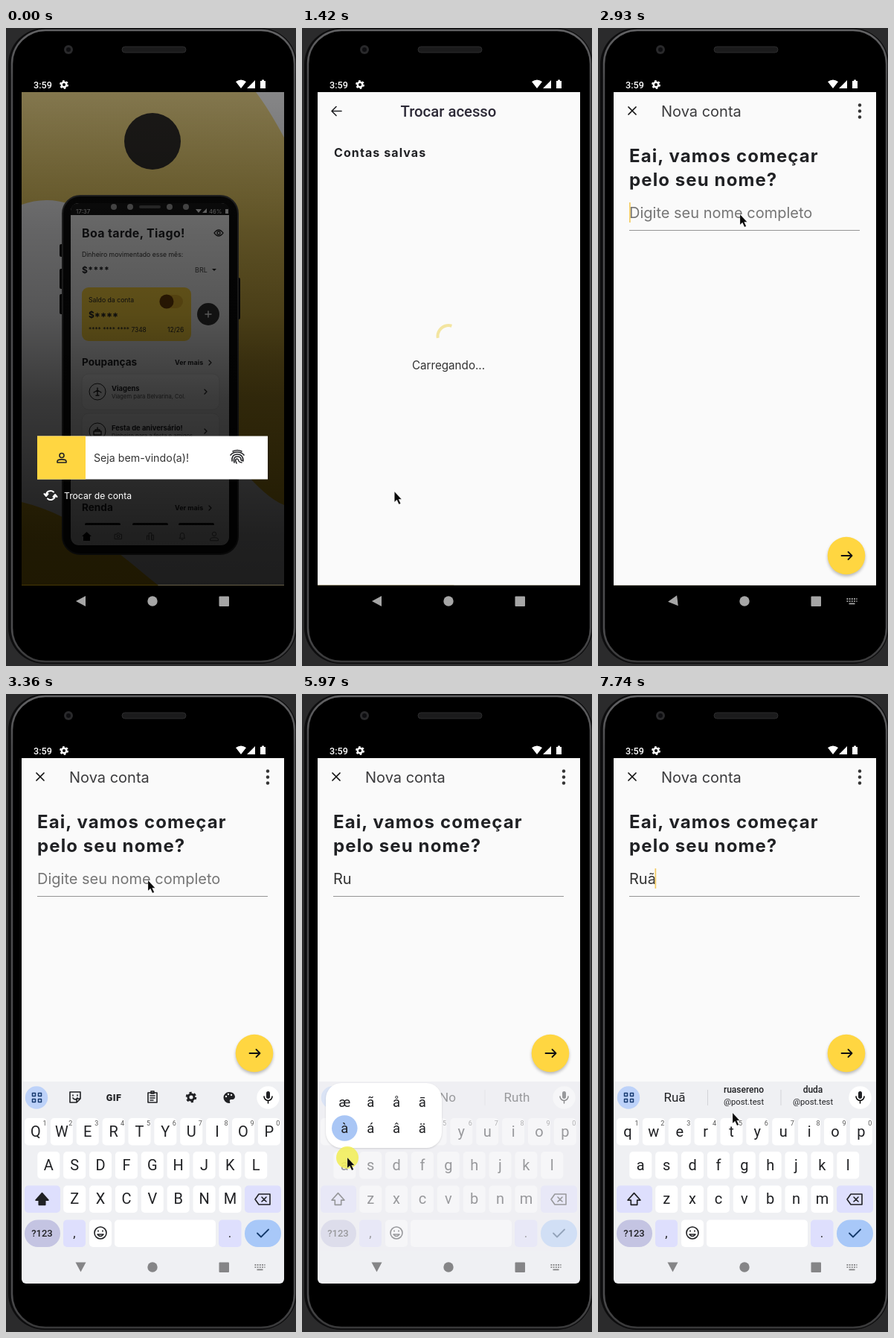
An HTML page for the animation above (8000 ms loop, 390x856 px).

```html
<!DOCTYPE html>
<html lang="pt-BR">
<head>
<meta charset="utf-8">
<title>Trocar acesso</title>
<style>
html, body { margin: 0; width: 100%; height: 100%; overflow: hidden; background: #2b2b2c; }
svg { display: block; width: 100vw; height: 100vh; font-family: Inter, "Open Sans", sans-serif; }
.rb { font-family: Roboto, Arial, sans-serif; }
.b { font-weight: 700; }
.m { text-anchor: middle; }
.line { fill: none; stroke: currentColor; stroke-linecap: round; stroke-linejoin: round; }
</style>
</head>
<body>
<svg id="stage" viewBox="0 0 390 856" preserveAspectRatio="none"></svg>
<script>
const LOOP = 8000, INK = '#202124', GOLD = '#ffd641', PAPER = '#fafafa';
const KEY_STEP = 34.87;

const text = (x, y, size, str, cls = '', fill = INK, extra = '') =>
  `<text x="${x}" y="${y}" font-size="${size}" class="${cls}" fill="${fill}" ${extra}>${str}</text>`;
const rect = (x, y, w, h, fill, r = 0, extra = '') =>
  `<rect x="${x}" y="${y}" width="${w}" height="${h}" rx="${r}" fill="${fill}" ${extra}/>`;
const disc = (x, y, r, fill, extra = '') => `<circle cx="${x}" cy="${y}" r="${r}" fill="${fill}" ${extra}/>`;
const spacing = n => `letter-spacing="${n}"`;

// Stroked icons, each drawn around its own centre.
const ICONS = {
  back: 'M7 0H-6M0-6L-6 0L0 6',
  next: 'M-7 0H7M2-5L7 0L2 5',
  close: 'M-5-5L5 5M5-5L-5 5',
  person: 'M-3-3.5a3 3 0 1 0 6 0a3 3 0 1 0-6 0M-6 6V4.5C-6 1 6 1 6 4.5V6Z',
  swap: 'M-6 0A6 6 0 0 1 4-4.5M6 0A6 6 0 0 1-4 4.5M-8.5-2L-6 1L-3.5-2M8.5 2L6-1L3.5 2',
  finger: 'M-6-8Q0-11 6-8M-9-3Q-6-7 0-7Q6-7 9-3M-7 5Q-8-4 0-4Q8-4 8 5M-4 7Q-6-1 0-1Q5-1 5 3Q5 5 8 4M-1 8Q-4 2 0 2Q1 2 2 5Q3 7 6 7',
  eye: 'M-6 0Q0-8 6 0Q0 8-6 0M-2 0a2 2 0 1 0 4 0a2 2 0 1 0-4 0',
  more: 'M-2-3L1 0L-2 3',
  plus: 'M-4 0H4M0-4V4',
  plane: 'M0-5V5M-5 1L0-2L5 1M-2 5H2',
  cake: 'M-5 5H5V0H-5ZM-3 0V-2H3V0M0-2V-5',
  camera: 'M-5-3H-2L-1-5H1L2-3H5V4H-5ZM-2 0a2 2 0 1 0 4 0a2 2 0 1 0-4 0',
  bars: 'M-5 5V-1H-2V5M-2 5V-5H2V5M2 5V-2H5V5Z',
  bell: 'M-4 3H4L3 1V-2A3 3 0 0 0-3-2V1ZM-1 5H1',
  grid: 'M-6-6h4v4h-4zM2-6h4v4h-4zM-6 2h4v4h-4zM2 2h4v4h-4z',
  sticker: 'M-7-7H7V2L2 7H-7ZM7 2H2V7M-3-2V-3M3-2V-3M-3 1Q0 5 3 1',
  clip: 'M-6-6H6V7H-6ZM-2-8H2V-5H-2ZM-3-2H3M-3 1H3M-3 4H1',
  shift: 'M0-8L-8 1H-4V7H4V1H8Z',
  erase: 'M-10 0L-5-7H10V7H-5ZM-1-3L5 3M5-3L-1 3',
  smile: 'M-8 0a8 8 0 1 0 16 0a8 8 0 1 0-16 0M-3-2V-3M3-2V-3M-4 2Q0 7 4 2Z',
  check: 'M-7 0L-2 5L8-5',
};
const icon = (name, x, y, color = INK, width = 1.6, scale = 1, fill = 'none') =>
  `<path class="line" transform="translate(${x} ${y}) scale(${scale})" d="${ICONS[name]}" ` +
  `style="color:${color};fill:${fill}" stroke-width="${width}"/>`;
const gear = (x, y, color, k = 1) => `<g transform="translate(${x} ${y}) scale(${k})" fill="none" stroke="${color}">
  <circle r="4" stroke-width="3"/><circle r="6" stroke-width="2.6" stroke-dasharray="3.1 3.18"/></g>`;

function phone() {
  return rect(3, 0, 388, 853, '#0d0d0e', 49) +
    rect(8, 3, 380, 847, '#000', 45, 'stroke="url(#rim)" stroke-width="2.5"') +
    disc(84, 29, 6, '#29292b') + disc(84, 29, 3, '#0d0d10') +
    rect(156, 25, 86, 8, '#1b1b1c', 4, 'stroke="#2b2b2c"');
}

function statusBar() {
  return text(37, 80.5, 12.6, '3:59', 'rb', '#fff', 'font-weight="500"') + gear(78, 76, '#fff', .82) +
    `<path fill="#fff" d="M309 72Q316 67 323 72L316 81ZM335 70V81H324ZM342 71h2v-1.500h3v1.500h2v10h-7z"/>`;
}

function mockPhone() {
  const g = '#222';
  const row = (y, ic, a, b) => rect(102, y, 185, 48, '#fff', 9, 'stroke="#e4e4e4"') +
    disc(123, y + 24, 11, 'none', `stroke="${g}"`) + icon(ic, 123, y + 24, g, 1.4) +
    text(142, y + 22.5, 9.4, a, 'b') + text(142, y + 33, 7.6, b, '', '#555') + icon('more', 269, y + 24, g, 1.3);
  const head = (y, s) => text(102, y, 13.6, s, 'b') + text(227, y - 1, 9, 'Ver mais', 'b') + icon('more', 275, y - 4, g, 1.3);
  return rect(72, 290, 5, 17, '#111', 2) + rect(72, 323, 5, 27, '#111', 2) + rect(72, 357, 5, 27, '#111', 2) +
    rect(311, 335, 4, 56, '#111', 2) +
    rect(76, 225, 236, 481, '#0c0c0c', 24, 'stroke="#444" stroke-width="2"') +
    rect(87, 235, 213, 459, '#f4f4f4', 11) +
    `<path d="M87 251V245Q88 235 98 235H289Q300 235 300 245V251Z" fill="#161616"/>` +
    text(94, 249, 8, '17:37', '', '#ddd') + text(273, 249, 7.8, '46%', '', '#ddd') +
    `<path d="M255 243h8l-4 5zM270 242v6h-6zM295 243h4v6h-4z" fill="#ddd"/>` +
    [145, 167, 220, 242].map(x => disc(x, 240, 4, '#999')).join('') + rect(179, 238, 29, 4, '#555', 2) +
    text(102, 281, 16, 'Boa tarde, Tiago!', 'b', INK, spacing(.35)) + icon('eye', 286, 275, g, 1.3) +
    text(102, 307, 8.7, 'Dinheiro movimentado esse mês:', '', '#333') + text(102, 329, 12, '$****', 'b', INK, spacing(.5)) +
    text(254, 328, 9, 'BRL', '', '#444') + `<path d="M277 323h6l-3 3z" fill="${g}"/>` +
    rect(102, 348, 147, 72, GOLD, 9) + rect(206, 358, 32, 18, '#e6b52d', 9) + disc(216, 367, 9.5, '#6b3d08') +
    text(111, 368, 8.7, 'Saldo da conta') + text(111, 389, 12, '$****', 'b') +
    text(111, 408, 8.4, '**** **** **** 7348') + text(217, 408, 8.6, '12/26') +
    disc(272, 384, 15, '#333') + icon('plus', 272, 384, '#fff', 1.4) +
    head(453, 'Poupanças') + row(464, 'plane', 'Viagens', 'Viagem para Belvarina, Col.') +
    row(517, 'cake', 'Festa de aniversário!', 'Dinheiro para a festa e amigos') + head(648, 'Renda') +
    [106, 170, 232].map(x => rect(x, 664, 48, 4, '#111', 2)).join('') +
    rect(88, 667, 211, 26, '#f4f4f4', 8) +
    `<path d="M102 682L108.500 676L115 682H113V688H104V682Z" fill="#000"/>` +
    ['camera', 'bars', 'bell', 'person'].map((n, i) => icon(n, 151 + i * 43, 682, '#666', 1.1, .9)).join('');
}

function login() {
  return rect(21, 86, 353, 662, 'url(#sun)') +
    `<path fill="#f4f4f6" d="M336 86Q353 108 374 147V86ZM21 237C60 223 105 232 140 280C200 400 300 610 374 640V748H205C160 712 100 655 21 636Z"/>` +
    disc(197, 152, 38, '#302d2a') + mockPhone() + rect(21, 86, 353, 662, 'url(#shade)') +
    rect(42, 547.5, 310, 58, '#fff') + rect(42, 547.5, 65, 58, GOLD) +
    icon('person', 75, 577, INK, 1.6) + text(118, 582, 14.2, 'Seja bem-vindo(a)!', '', '#333') + icon('finger', 311, 576, INK, 1.6) +
    icon('swap', 60, 627, '#fff', 2) + text(78, 631.5, 12.2, 'Trocar de conta', '', '#fff');
}

function accounts() {
  return rect(21, 64, 353, 700, PAPER) + icon('back', 46, 111) +
    text(197, 118, 20.3, 'Trocar acesso', 'rb m', '#2d2a37', 'font-weight="500"') +
    text(43, 172, 16, 'Contas salvas', 'b', INK, spacing(1.1)) +
    `<g id="loading"><circle id="spin" r="14.500" fill="none" stroke="#f3e5a0" stroke-width="4" pathLength="100"/>` +
    text(197, 457, 15.2, 'Carregando...', 'm', '#333') + `</g><g id="saved">` +
    rect(39, 202, 49.5, 49.5, GOLD, 3) + text(63.5, 233, 16, 'Ti', 'b m') +
    text(99, 224, 15.6, 'Tiago Valverino', '', INK, 'font-weight="600" letter-spacing=".9"') +
    text(99, 242, 12.9, 'ID: 915d2ad0-4379-11ee-b5b4-...', '', '#333') +
    `<path d="M328 221h12v-2h-3l-1-1h-4l-1 1h-3zM329 223h10v11q0 2-2 2h-6q-2 0-2-2z" fill="${INK}"/></g>`;
}

function form() {
  return rect(21, 64, 353, 700, PAPER) + icon('close', 46, 111, '#111', 1.7) +
    text(85, 118.5, 20, 'Nova conta', '', '#3b3b3d') +
    [103.5, 111.5, 119.5].map(y => disc(352, y, 2.2, '#333')).join('') +
    text(42, 180, 24, 'Eai, vamos começar', 'b', INK, spacing(1.1)) +
    text(42, 212, 24, 'pelo seu nome?', 'b', INK, spacing(1.1)) +
    text(42, 254.5, 20, '', '', '#757575', 'id="field"') +
    rect(42, 271, 310, 1, '#949494') + rect(0, 234, 1.7, 27, '#f3cb62', 0, 'id="caret"') +
    `<g id="fab">${disc(334, 710.5, 25, '#000', 'opacity=".28" filter="url(#soft)"')}${disc(334, 708, 25.3, GOLD)}${icon('next', 334.5, 708, '#111', 1.8)}</g>`;
}

function keyboard() {
  const tint = '#dedffd';
  const key = (x, y, w, fill = '#fff', r = 5) => rect(x, y, w, 36.5, fill, r);
  const letters = (row, x0, y) => [...row].map((c, i) => {
    const x = x0 + i * KEY_STEP;
    return key(x - 15, y, 30) + text(x, y + 24.5, 20, c, 'rb m letter');
  }).join('');
  const hints = [...'1234567890'].map((c, i) => text(52 + i * KEY_STEP, 579, 9, c, 'rb m', '#555')).join('');
  const tools = icon('sticker', 93, 541) +
    text(145, 546, 12.5, 'GIF', 'm rb', INK, 'font-weight="900" letter-spacing=".4"') + icon('clip', 197, 541) + gear(249, 541, INK) +
    `<path fill="${INK}" d="M300 534a7.500 7.500 0 0 0 0 15q2 0 1-2q-1-3 2-3h2q3-1 3-4q-1-6-8-6"/>` +
    [[296, 540], [299, 537], [303, 538]].map(p => disc(...p, 1.2, '#eee')).join('');
  return rect(21, 520, 353, 271, '#eff0f3') + disc(41, 541.5, 15.2, '#bdd2f9') + icon('grid', 41.5, 541.5, '#173a70', 1.5) +
    disc(352.5, 541.5, 15.2, '#fff') +
    rect(350, 533, 5, 10, INK, 2.5) + `<path class="line" d="M347 540a5.500 5.500 0 0 0 11 0M352.500 546v3" stroke-width="1.5"/>` +
    `<g id="tools">${tools}</g><g id="hints"><path d="M147.500 531v21M246 531v21" stroke="#d3d4d8"/><g id="words"></g></g>` +
    letters('qwertyuiop', 40, 569) + hints + letters('asdfghjkl', 57.3, 614) + letters('zxcvbnm', 92.2, 659.5) +
    key(25, 659.5, 48, tint) + `<g id="shift">${icon('shift', 48.5, 678, INK, 1.6, 1.05, 'var(--lock)')}</g>` +
    key(321, 659.5, 49, tint) + icon('erase', 345, 678) +
    key(25, 705.5, 48, '#c4c4e2', 18) + text(48.5, 728, 13, '?123', 'rb m', INK, 'font-weight="500"') +
    key(77, 705.5, 30, tint) + text(92, 729, 17, ',', 'rb m') + key(112, 705.5, 30) + icon('smile', 127, 723) +
    key(146, 705.5, 136) + key(286, 705.5, 30.5, tint) + text(301, 729, 17, '.', 'rb m') +
    key(321, 705.5, 49, '#a8c8f8', 18) + icon('check', 345, 723.5, '#143a6b', 1.8) +
    rect(21, 520, 353, 227, '#f0f0f3', 0, 'id="dim" opacity=".58"');
}

function accents() {
  const cells = ['æãåā', 'àáâä'].map((row, j) => [...row].map((c, i) =>
    text(57.3 + i * KEY_STEP, 554 + j * 34.5, 18.5, c, 'rb m')).join('')).join('');
  return rect(32, 522, 156, 87, '#fff', 21, 'filter="drop-shadow(0 1px 1px #0002)"') + disc(0, 0, 17.3, '#a9c6f5', 'id="pick"') + cells;
}

function nav() {
  return `<g id="nav"><path id="tri" d="M-6.500 0L6.500-7V7Z" fill="currentColor"/>` +
    disc(197, 769, 6.7, 'currentColor') + rect(286.5, 762.5, 13.5, 13.5, 'currentColor', 1) +
    `<g id="kbd" stroke="currentColor" stroke-width="1.8" stroke-dasharray="1.800 1.400"><path d="M334.500 766h14M334.500 769.200h14"/>` +
    `<path d="M337.500 772.400h8" stroke-dasharray="none"/></g></g>`;
}

stage.innerHTML = `<defs>
  <linearGradient id="rim" x2="0" y2="1"><stop stop-color="#626264"/><stop offset=".08" stop-color="#4b4b4d"/><stop offset=".95" stop-color="#4b4b4d"/><stop offset="1" stop-color="#39393a"/></linearGradient>
  <linearGradient id="sun" x2="0" y2="1"><stop stop-color="#eed88e"/><stop offset=".25" stop-color="#e8ca60"/><stop offset=".55" stop-color="#c8a534"/><stop offset="1" stop-color="#ffca10"/></linearGradient>
  <linearGradient id="shade" x2="0" y2="1"><stop stop-opacity=".45"/><stop offset=".28" stop-opacity=".59"/><stop offset=".45" stop-opacity=".65"/><stop offset=".62" stop-opacity=".77"/><stop offset=".9" stop-opacity=".87"/><stop offset="1" stop-opacity=".88"/></linearGradient>
  <filter id="soft" x="-30%" y="-30%" width="160%" height="160%"><feGaussianBlur stdDeviation="2.2"/></filter>
  <clipPath id="screen"><rect x="21" y="86" width="353" height="661.5"/></clipPath>
  <clipPath id="glass"><rect x="21" y="86" width="353" height="705" rx="6"/></clipPath></defs>
  ${phone()}${statusBar()}
  <g clip-path="url(#screen)">${login()}<g id="accounts">${accounts()}</g><g id="form">${form()}</g></g>
  <g clip-path="url(#glass)"><g id="keys">${keyboard()}</g></g>${nav()}
  <g id="accents">${accents()}</g>
  <g id="mouse">${disc(0, 0, 15, '#f1ee58', 'id="press" opacity=".88"')}
  <path d="M0 0V14L3.200 11L6 17L8.300 16L5.600 10.300H9.500Z" fill="#0a0a0a" stroke="#fff" stroke-opacity=".45" stroke-width=".5"/></g>`;

const el = id => document.getElementById(id);
const show = (id, on) => el(id).style.display = on ? '' : 'none';
const move = (id, x, y, more = '') => el(id).setAttribute('transform', `translate(${x} ${y}) ${more}`);
const phase = (t, start, length) => Math.min(1, Math.max(0, (t - start) / length));
const easeOut = x => 1 - (1 - x) ** 3;
const easeInOut = x => x * x * (3 - 2 * x);
const latest = (table, t) => table.filter(row => row[0] <= t).pop();
const slideIn = (id, t, start) => move(id, 0, 684 * (1 - easeOut(phase(t, start, 520))));

// Pointer stops: time, x, y.
const PATH = [[70, 355, 811], [700, 124, 622], [1400, 124, 622], [1800, 167, 625], [2100, 167, 625], [2500, 191, 250],
  [5020, 191, 250], [5430, 61, 622], [6040, 61, 622], [6720, 63, 632], [7330, 112, 612], [7500, 112, 612], [7740, 181, 562]];
const PRESSES = [[770, 900], [1850, 1980], [2600, 2750], [5430, 7530]];
// Time, typed text, caret x.
const TYPED = [[2660, '', 42], [3820, 'R', 56], [3960, 'Ru', 65.5], [7590, 'Ruã', 76.5]];
const WORDS = [[0, []], [3820, ['R', 'No', 'Ruth']], [4230, ['Ru', 'No', 'Ruth']],
  [7590, ['Ruã', 'ruasereno @post.test', 'duda @post.test']]];
// Time, column and row of the highlighted accent.
const PICKS = [[0, 0, 1], [6600, 1, 1], [6950, 1, 0]];

function pointerAt(t) {
  const i = PATH.findIndex(p => p[0] > t);
  if (i < 1) return PATH[PATH.length - 1];
  const [a, b] = [PATH[i - 1], PATH[i]], k = easeInOut(phase(t, a[0], b[0] - a[0]));
  return a.map((v, n) => v + (b[n] - v) * k);
}

function suggestion(str, i) {
  const x = [103, 196, 289][i], [top, domain] = str.split(' ');
  return domain ? text(x, 535, 12, top, 'rb m', INK, 'font-weight="500"') + text(x, 550.5, 11.2, domain, 'rb m')
    : text(x, 547, 17, top, 'rb m');
}

let wordsShown;
function draw(t) {
  slideIn('accounts', t, 949.5);
  slideIn('form', t, 2035.2);
  const loaded = t >= 1450;
  show('loading', !loaded);
  show('saved', loaded);
  const turn = phase(t, 1080, 1000);
  el('spin').setAttribute('stroke-dasharray', `${12 + 60 * turn} 100`);
  move('spin', 197, 413, `rotate(${-68 + 700 * turn})`);

  const rise = easeOut(phase(t, 2980, 340));
  show('keys', rise > 0);
  move('keys', 0, 271 * (1 - rise));
  move('fab', 0, -226 * rise);
  move('tri', 100.5, 769, `rotate(${-90 * easeInOut(phase(t, 2880, 300))})`);
  el('nav').style.color = rise > .2 ? '#858587' : '#a6a6a6';
  show('kbd', t >= 2800);

  const typed = latest(TYPED, t), value = typed ? typed[1] : '';
  el('field').textContent = value || 'Digite seu nome completo';
  el('field').setAttribute('fill', value ? '#333' : '#757575');
  show('caret', typed && Math.floor((t - typed[0]) / 515) % 2 === 0);
  if (typed) el('caret').setAttribute('x', typed[2]);

  const words = latest(WORDS, t)[1], lower = words.length > 0;
  if (words !== wordsShown) {
    wordsShown = words;
    el('words').innerHTML = words.map(suggestion).join('');
    show('tools', !lower);
    show('hints', lower);
    el('shift').style.setProperty('--lock', lower ? 'none' : INK);
    document.querySelectorAll('.letter').forEach(k =>
      k.textContent = lower ? k.textContent.toLowerCase() : k.textContent.toUpperCase());
  }

  show('accents', t >= 5600 && t < 7530);
  show('dim', t >= 5970 && t < 7590);
  const [, col, line] = latest(PICKS, t);
  move('pick', 57.3 + col * KEY_STEP, 548 + line * 34.5);

  const [, x, y] = pointerAt(t);
  show('mouse', t >= 70);
  move('mouse', x, y);
  show('press', PRESSES.some(([a, b]) => t >= a && t < b));
}

const begin = performance.now();
function tick() {
  draw((performance.now() - begin) % LOOP);
  requestAnimationFrame(tick);
}
tick();
</script>
</body>
</html>
```
